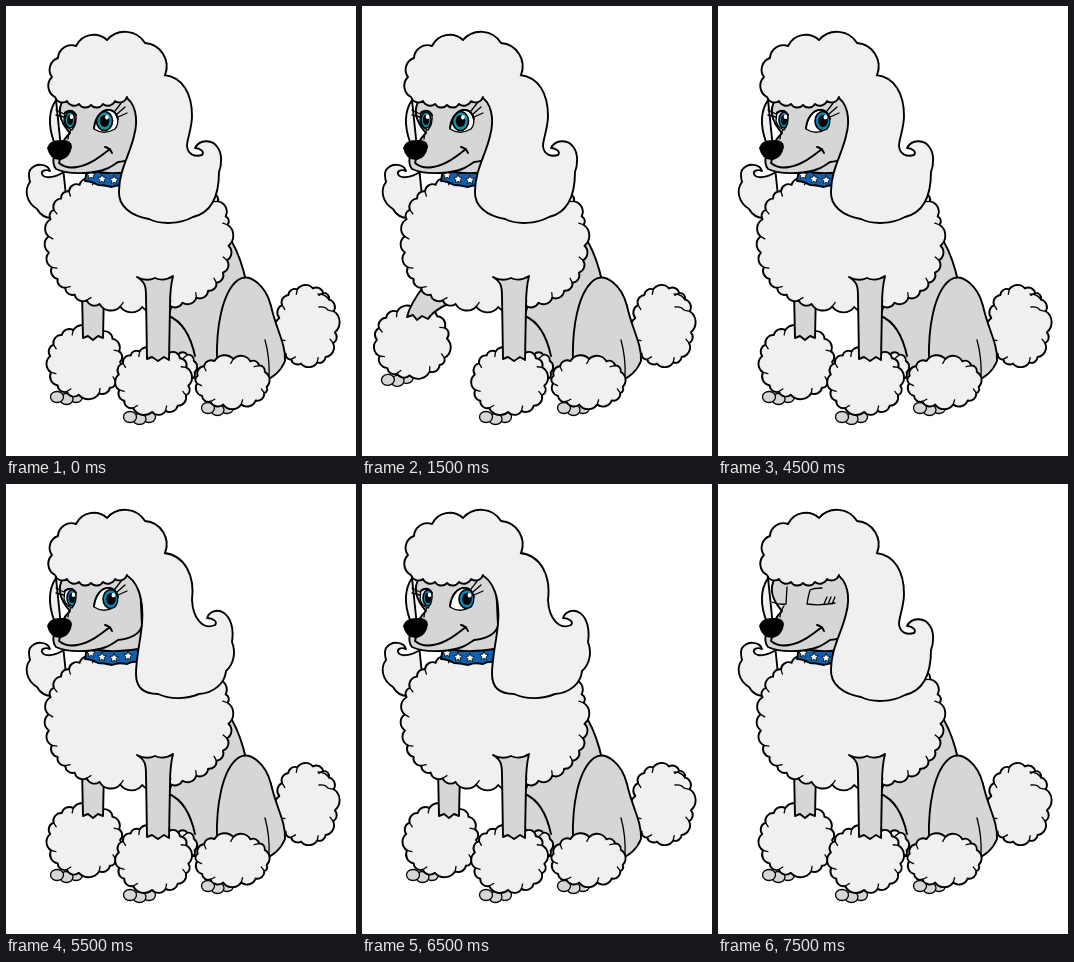
Write an HTML page that moves like this. It is 350 px wide and 450 px high and loops after 8 s.

```html
<!DOCTYPE html>
<html lang="en">
<head>
<meta charset="utf-8">
<title>Poodle</title>
<style>
html, body { margin: 0; width: 100%; height: 100%; overflow: hidden; background: #fff; }
svg { display: block; width: 350px; height: 450px; }
#dog { stroke: #000; stroke-width: 1.9; stroke-linecap: round; stroke-linejoin: round; fill: none; }
.fur { fill: #f0f0f0; }
.skin { fill: #d6d6d6; }
.thin { stroke-width: 1.3; }
.black { fill: #000; }
</style>
</head>
<body>
<svg viewBox="0 0 350 450"><g id="dog"></g></svg>
<script>
let seed = 7;
const random = () => (seed = seed * 16807 % 2147483647) / 2147483647;
const path = (cls, d) => `<path class="${cls}" d="${d}"/>`;
const group = (id, body) => `<g id="${id}">${body}</g>`;
const ellipse = (x, y, rx, ry, fill, extra = '') =>
  `<ellipse cx="${x}" cy="${y}" rx="${rx}" ry="${ry}" fill="${fill}" ${extra}/>`;

// Round tufts between neighbouring points.
function tufts(points) {
  return `M${points[0]}` + points.slice(1).map(([x, y], i) => {
    const r = 0.62 * Math.hypot(x - points[i][0], y - points[i][1]);
    return `A${r},${r} 0 0 1 ${x},${y}`;
  }).join('');
}

// Fluffy rounded shape with n uneven tufts; some creases run inwards.
function fluff(cx, cy, rx, ry, n, power = 0.85) {
  const bend = v => Math.sign(v) * Math.abs(v) ** power;
  const points = [];
  let creases = '';
  for (let i = 0; i < n; i++) {
    const a = (i + 0.45 * random()) / n * 2 * Math.PI;
    const dx = rx * bend(Math.cos(a)), dy = ry * bend(Math.sin(a));
    points.push([cx + dx, cy + dy]);
    if (i % 2) creases += `M${cx + dx},${cy + dy}l${-5 * Math.cos(a + 0.5)},${-5 * Math.sin(a + 0.5)}`;
  }
  return path('fur', tufts([...points, points[0]])) + path('thin', creases);
}

const toes = (x, y) => [2, 1, 0].map(i =>
  ellipse(x + 9.5 * i, y + 2 * (i % 2), 6.5, 5.5, '#d6d6d6', 'class="thin"')).join('');

function star(x, y) {
  let d = '';
  for (let i = 0; i < 10; i++) {
    const a = i * Math.PI / 5 - Math.PI / 2, r = i % 2 ? 2.3 : 4.5;
    d += `${i ? 'L' : 'M'}${x + r * Math.cos(a)},${y + r * Math.sin(a)}`;
  }
  return `<path d="${d}Z" fill="#fff" stroke-width=".8"/>`;
}

const eyeShape = 'M59,106 Q66,102 70,109 Q71,118 66,124 Q60,122 58,115 Z' +
  'M88,123 C89,112 95,103 104,104 C112,106 114,117 109,123 C102,127 94,127 88,123 Z';

function openEyes(id, leftX, rightX, color) {
  const iris = (x, y, rx, ry) =>
    ellipse(x, y, rx, ry, color, 'stroke-width="1.6"') +
    ellipse(x, y, rx * .6, ry * .62, '#000', 'stroke="none"') +
    ellipse(x + rx * .3, y - ry * .4, 1.8, 2.2, '#fff', 'stroke="none"');
  return group(id,
    `<path d="${eyeShape}" fill="#fff" stroke="none"/>
    <g clip-path="url(#sockets)">${iris(leftX, 114, 5, 8)}${iris(rightX, 115, 8, 9.5)}</g>` +
    path('thin', eyeShape) +
    path('', 'M59,107 Q66,102 70,109 M88,122 C89,112 95,103 104,104 Q110,105 112,113') +
    path('thin', 'M58,108 L50,104 M58,111 L50,109 M109,105 L116,96 M111,108 L119,101 M112,111 L121,107 M91,98 Q99,94 106,97'));
}

const closedEyes = group('closed', path('thin',
  'M69,103 L68,120 Q60,121 54,118 M104,104 Q96,104 92,106 Q90,113 89,120 Q102,122 117,119 M93,97 Q100,94 105,98' +
  [106, 110, 114].map(x => `M${x},120l3,-7`).join('')));

// Ends of the hair cap, then its fringe from right to left, then its crown.
const fringe = Array.from({ length: 7 }, (_, i) => [121 - 12 * i, 91 + 8 * Math.sin(Math.PI * i / 6)]);
const crown = [[46, 71], [52, 52], [70, 40], [101, 34], [139, 37], [159, 69]];

const paw = toes(51, 391) + fluff(79, 356, 35, 33, 16);

document.getElementById('dog').innerHTML =
  `<clipPath id="sockets"><path d="${eyeShape}"/></clipPath>` +
  // tail, body and hind legs
  group('tail', fluff(301, 320, 28, 38, 16) + path('thin', 'M312,288 Q320,288 323,294 M313,301 Q319,300 322,304')) +
  path('skin', 'M190,230 L226,236 Q235,252 240,275 L265,300 L262,372 H163 V308 Z') +
  path('', 'M163,310 Q182,318 189,350') +
  fluff(176, 362, 13, 14, 9) +
  path('skin', 'M211,355 C210,322 216,286 232,274 C244,266 260,280 265,300 C270,323 280,338 279,355 Q273,370 256,376 Z') +
  path('thin', 'M259,334 Q264,352 263,372') +
  toes(202, 402) +
  fluff(226, 376, 35, 23, 15) +
  // front leg that lifts
  group('pawDown', paw + path('skin', 'M76,285 L77,332 l5,-2 l5,4 l5,-4 l5,2 L98,285')) +
  group('pawUp',
    `<g transform="translate(-29 -20) rotate(-6 80 355)">${paw}</g>` +
    path('skin', 'M62,280 Q48,298 45,311 l6,-2 l4,5 l5,-4 l6,3 Q72,303 95,294')) +
  // far ear, chest and near front leg
  path('fur', 'M50,94 C42,106 43,122 48,136 L60,160 L58,166 C48,172 38,173 36,168 C35,165 39,163 44,165 C42,158 30,156 24,164 C22,168 23,172 24,176 C18,184 20,196 31,203 Q36,212 46,212 L60,190 Z') +
  fluff(132.5, 235, 90, 66, 34, 0.78) +
  toes(124, 411) +
  fluff(147.5, 375, 35, 31, 16) +
  path('skin', 'M131,271 C139,276 140,280 140,290 L141,353 l5,-2 l6,4 l6,-4 l5,3 L164,300 Q164,282 167,270 Q158,276 149,272 Q140,276 131,271 Z') +
  // neck and collar
  `<path class="skin" d="M78,160 L136,138 V170 H80 Z" stroke="none"/>
  <path d="M81,163 Q98,170 132,165 V178 Q126,177 121,180 Q112,178 106,181 Q98,179 92,179 Q85,175 79,175 Z" fill="#1062b0"/>` +
  star(85, 169) + star(96, 173) + star(108, 174) + star(122, 172) +
  // face
  path('skin', 'M57,94 C50,106 56,118 64,127 Q59,132 57,136 L48,150 Q46,158 50,163 Q60,168 79,167 C98,166 105,161 112,156 Q132,154 136,142 L134,100 L118,85 Z') +
  path('black', 'M42,142 Q44,135 54,135 Q65,134 65,141 Q63,151 55,153 Q45,154 42,142 Z') +
  path('', 'M54,153 L53,157 Q60,163 71,161 C84,159 95,150 104,143 M99,141 Q104,142 106,147') +
  path('thin', 'M66,122 Q62,128 62,133') +
  openEyes('aside', 64, 98.5, '#1092a8') + openEyes('ahead', 66, 105, '#0b82b4') + closedEyes +
  // near ear and hair
  group('earIn', path('fur', 'M118,90 C129,96 133,112 128,130 C124,148 113,165 113,185 C112,200 125,210 143,213 C155,219 174,218 187,211 C204,207 213,192 213,166 C216,158 216,148 212,142 C206,132 193,134 189,142 C194,142 199,146 196,149 C189,151 182,149 181,140 C181,133 186,122 186,110 C186,88 177,71 158,69 L144,69')) +
  group('earOut', path('fur', 'M118,90 C132,96 138,115 136,140 C134,160 130,174 130,190 C130,205 140,210 152,210 C165,216 181,215 193,210 C208,209 219,199 220,187 C228,180 230,168 226,158 C228,145 225,134 218,129 C211,124 203,128 201,134 C207,134 212,138 209,141 C198,146 187,136 186,116 C189,92 179,71 158,69 L144,69')) +
  path('fur', tufts([...fringe, ...crown]));

const show = (id, visible) => document.getElementById(id).style.display = visible ? '' : 'none';

function draw() {
  const step = Math.floor(performance.now() % 8000 / 500);
  const blink = step % 7 === 1;
  const lifted = step >= 3 && step < 7;
  const earOut = step === 11 || step === 13;
  show('closed', blink);
  show('aside', !blink && step < 8);
  show('ahead', !blink && step > 8);
  show('pawUp', lifted);
  show('pawDown', !lifted);
  show('earOut', earOut);
  show('earIn', !earOut);
  document.getElementById('tail').setAttribute('transform', step === 7 ? 'translate(-9 -15)' : '');
  requestAnimationFrame(draw);
}
draw();
</script>
</body>
</html>
```
